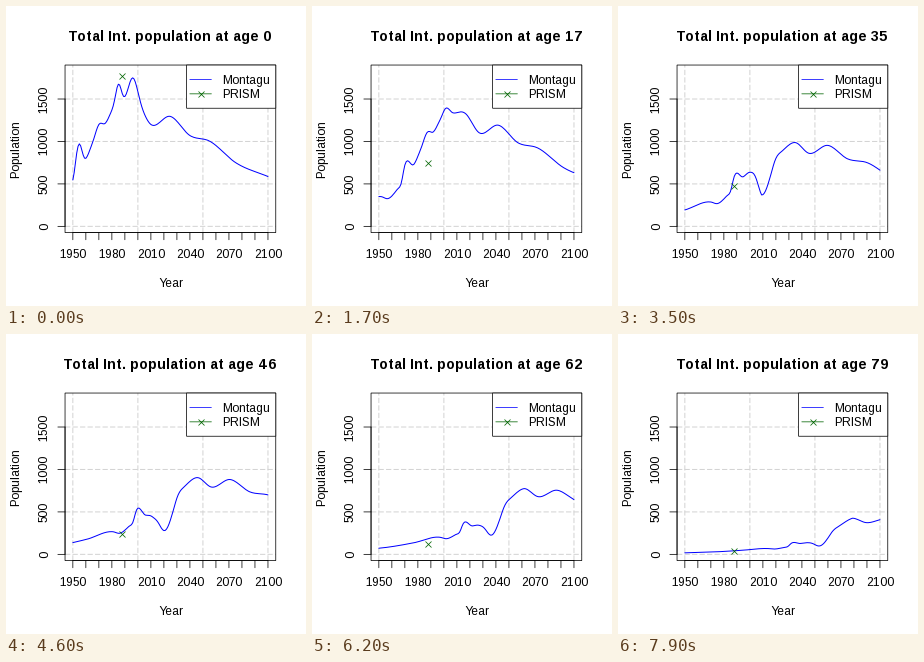
Animation, 300 px wide and 300 px high, one loop 8 s. Source, as a matplotlib script:

```python
import numpy as np
import matplotlib.pyplot as plt
from matplotlib.animation import FuncAnimation
from matplotlib.patches import Rectangle

plt.rcParams["font.family"] = "Liberation Sans"
plt.rcParams["path.snap"] = False
plt.rcParams["text.hinting"] = "force_autohint"
plt.rcParams["text.hinting_factor"] = 1    # whole-pixel letter advances

SIZE, DPI = 300, 100
PX = 72 / DPI                      # points per pixel
HAIR = 0.75 * PX
LEFT, RIGHT, TOP, BOTTOM = 59.04, 269.76, 59.04, 226.56
FIRST, LAST = 1950, 2100
AGES = 80
CENSUS_YEAR = 1988
YEARS = np.arange(FIRST, LAST + 1)

# Turning points of cohort size by birth year.
COHORTS = np.array([
    (1871, 95), (1895, 158), (1915, 256), (1935, 380), (1940, 355),
    (1947, 470), (1950, 540), (1953, 780), (1960, 795), (1965, 980),
    (1970, 1200), (1975, 1215), (1980, 1365), (1984, 1500), (1990, 1450),
    (2000, 1430), (2010, 1200), (2025, 1295), (2040, 1070), (2055, 1005),
    (2075, 752), (2100, 587)], float)
SURVIVAL = [(0, 1), (17, 0.92), (35, 0.755), (46, 0.70),
            (55, 0.66), (69, 0.54), (79, 0.33)]
CENSUS = [(0, 1771), (17, 746), (35, 481), (46, 240),
          (55, 140), (69, 93), (79, 34)]


def px_x(year):
    return 66.84 + (np.asarray(year) - FIRST) * 195.12 / (LAST - FIRST)


def px_y(value):
    return 220.36 - 0.0849 * np.asarray(value)


def lerp(x, points):
    return np.interp(x, *zip(*points))


def spline(x, points):
    """Cubic Hermite curve through the points."""
    px, py = points.T
    slope = np.gradient(py, px)
    i = np.clip(np.searchsorted(px, x, side="right") - 1, 0, len(px) - 2)
    h = px[i + 1] - px[i]
    t = (x - px[i]) / h
    return (py[i] * (1 + 2 * t) * (1 - t) ** 2 + py[i + 1] * t * t * (3 - 2 * t)
            + h * t * (1 - t) * (slope[i] * (1 - t) - slope[i + 1] * t))


def bell(x, mid, width):
    return np.exp(-((x - mid) / width) ** 2 / 2)


def population(age):
    """Cohort size, less emigration and mortality up to this age."""
    born = YEARS - age
    ripple = (140 * bell(born, 1955, 2) + 165 * bell(born, 1985.3, 2)
              + 300 * bell(born, 1996, 3.5))
    size = spline(born, COHORTS) + ripple * np.exp(-age / 6)

    # Emigration starts at 16, but not before 1990.
    t = np.clip((age - np.maximum(16, 1990 - born)) / 24, 0, 1)
    loss = 0.67 / (1 + ((born - 1974.5) / 10.5) ** 2)
    stay = 1 - loss * t * t * (3 - 2 * t)

    # Older cohorts have a steeper late-life decline.
    adult = lerp(min(age, 46), SURVIVAL)
    late = lerp(age, SURVIVAL) / adult
    steep = np.interp(born, [1950, 2000], [1.75, 1])
    return size * stay * adult * late ** steep


fig = plt.figure(figsize=(SIZE / DPI, SIZE / DPI), dpi=DPI, facecolor="white")
ax = fig.add_axes([0, 0, 1, 1])
ax.set_xlim(0, SIZE)
ax.set_ylim(SIZE, 0)
ax.axis("off")


def line(x, y, color="black", width=HAIR, z=2, **kw):
    kw.setdefault("solid_capstyle", "round")
    return ax.plot(x, y, color=color, lw=width, zorder=z, **kw)[0]


def label(x, y, text, size=12, ha="center", **kw):
    return ax.text(x, y, text, fontsize=size * PX, ha=ha, va="baseline",
                   rotation_mode="anchor", zorder=7, **kw)


def frame_box(x, y, fill, z):
    ax.add_patch(Rectangle((x, TOP), RIGHT - x, y - TOP, facecolor=fill,
                           edgecolor="black", lw=HAIR, zorder=z))


def cross(x, y, z):
    return ax.plot([x], [y], "x", color="darkgreen", ms=6.2 * PX,
                   mew=HAIR, zorder=z)[0]


# Grid
dashes = {"linestyle": (0, (5.25, 2.25)), "dash_capstyle": "butt"}
for year in range(FIRST, LAST + 1, 50):
    line([px_x(year)] * 2, [BOTTOM, TOP], "lightgray", PX, 1, **dashes)
for value in range(0, 1501, 500):
    line([LEFT, RIGHT], [px_y(value)] * 2, "lightgray", PX, 1, **dashes)

# Axes
frame_box(LEFT, BOTTOM, "none", 4)
line(px_x([FIRST, LAST]), [BOTTOM] * 2)
line([LEFT] * 2, px_y([0, 1500]))
for year in range(FIRST, LAST + 1, 10):
    line([px_x(year)] * 2, [BOTTOM, BOTTOM + 7.2])
for year in range(FIRST, LAST + 1, 30):
    label(px_x(year), 252.4, str(year))
for value in range(0, 1501, 500):
    line([LEFT - 7.2, LEFT], [px_y(value)] * 2)
    label(41.8, px_y(value), str(value), rotation=90)
mid_x, mid_y = (LEFT + RIGHT) / 2, (TOP + BOTTOM) / 2
label(mid_x, 281.2, "Year")
label(13, mid_y, "Population", rotation=90)
title = label(mid_x, 34.9, "", size=14.4, weight="bold")

# Legend
frame_box(180.6, 102.24, "white", 5)
for y, name, color in ((73.44, "Montagu", "blue"),
                       (87.84, "PRISM", "darkgreen")):
    line([183.8, 205.4], [y, y], color, z=6)
    label(216.2, y + 4.3, name, ha="left")
cross(194.6, 87.84, 6)

curve = line([], [], "blue", PX, z=3, solid_joinstyle="round")
census = cross(px_x(CENSUS_YEAR), 0, 3)


def update(age):
    title.set_text(f"Total Int. population at age {age}")
    curve.set_data(px_x(YEARS), px_y(population(age)))
    census.set_ydata([px_y(lerp(age, CENSUS))])
    return title, curve, census


anim = FuncAnimation(fig, update, frames=AGES, interval=100,
                     repeat=True, repeat_delay=0)
plt.show()
```
